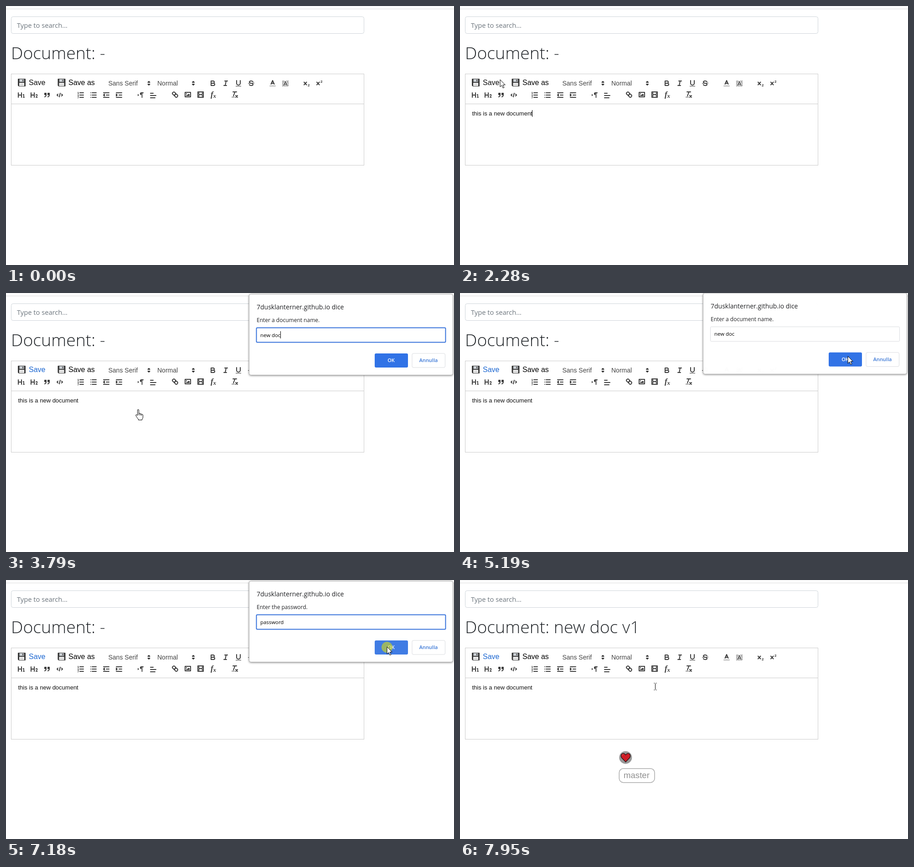
Animation, 983 px wide and 570 px high, one loop 8 s. Source, as an HTML page:

```html
<!DOCTYPE html>
<html lang="en">
<head>
<meta charset="utf-8">
<title>Document editor</title>
<style>
  html, body { margin: 0; height: 100%; overflow: hidden; background: #fff; }
  svg { display: block; }
  .ui { font-family: "Open Sans", "Noto Sans", sans-serif; }
  .arial { font-family: "Liberation Sans", Arial, sans-serif; }
  .stroke, .thin, .digit { fill: none; stroke: #3c3c3c; stroke-width: 2; stroke-linecap: round; stroke-linejoin: round; }
  .thin { stroke-width: 1; }
  .digit { stroke-width: 1.6; }
  .fill { fill: #3c3c3c; }
  .box { fill: #fff; stroke: #ccc; }
  .cursor { fill: #fff; stroke: #000; stroke-linejoin: round; }
  #sheet { filter: drop-shadow(0 1px 2px rgba(0, 0, 0, .45)); }
</style>
</head>
<body>
<svg width="983" height="570" viewBox="0 0 983 570">
  <defs>
    <pattern id="hatch" width="2.5" height="2.5" patternUnits="userSpaceOnUse" patternTransform="rotate(45)">
      <path d="M.6 0V2.5" stroke="#444" stroke-width="1"/>
    </pattern>
    <g id="floppy">
      <path d="M0 1Q0 0 1 0H16Q17 0 17 1V16Q17 17 16 17H2L0 15Z" fill="#383838"/>
      <path d="M3.5 1H13.5V7H3.5Z" fill="#c9ced3"/>
      <path d="M10 2H12V6H10Z" fill="#555"/>
      <path d="M3 9H14V16H3Z" fill="#f4f4f4"/>
      <path d="M4.5 11.5H12.5M4.5 13.5H12.5" stroke="#c4c4c4"/>
    </g>
  </defs>

  <path d="M0 .5H983" stroke="#f0f0f0"/>
  <path d="M0 6.5H983" stroke="#dcdcdc"/>
  <rect class="box" x="11.5" y="23.5" width="774" height="37" rx="4" style="stroke:#ced4da"/>
  <text class="ui" x="24" y="48" font-size="14.7" fill="#6c757d">Type to search...</text>
  <text class="ui" id="title" x="11" y="116.5" font-size="37.4" font-weight="300" fill="#212529"></text>

  <rect class="box" x="11.5" y="149.5" width="774" height="201"/>
  <path d="M11 215.5H786" stroke="#ccc"/>
  <use href="#floppy" x="26" y="160"/>
  <use href="#floppy" x="113.5" y="160"/>
  <g class="arial">
    <text id="save" x="50" y="174" font-size="16">Save</text>
    <text x="137" y="174" font-size="16">Save as</text>
    <g font-size="14" fill="#444">
      <text x="224.5" y="175">Sans Serif</text>
      <text x="332" y="175">Normal</text>
    </g>
    <text id="body" x="26.5" y="241" font-size="13" fill="#111">this is a new document</text>
  </g>
  <g id="icons"></g>
  <rect id="bodyCaret" y="229" width="1" height="15"/>

  <g id="graph">
    <circle cx="363.3" cy="390.7" r="14" fill="#999"/>
    <path d="M363.5 400.5L354.5 391Q351.5 386 355.5 382.5Q360 380 363.5 385Q367 380 371.5 382.5Q375.5 386 372.5 391Z" fill="#cf1d26" stroke="#2a1515" stroke-width="1.3"/>
    <path d="M356 386Q356.5 384 358.5 384" fill="none" stroke="#ee777b"/>
    <rect x="349.3" y="415" width="77.7" height="30.7" rx="9" fill="#fff" stroke="#aaa" stroke-width="1.5"/>
    <text class="arial" x="359" y="436.3" font-size="18.6" fill="#909090">master</text>
  </g>

  <g id="dialog" class="ui">
    <rect id="sheet" x="533.5" y="2.5" width="447" height="178" rx="4" fill="#fff" stroke="#b0b0b0"/>
    <text x="550" y="35.7" font-size="14" fill="#202124">7dusklanterner.github.io dice</text>
    <text id="prompt" x="550" y="64" font-size="12" fill="#202124"></text>
    <rect id="field" x="549.5" y="76.5" width="415" height="32" rx="2" fill="#fff"/>
    <text id="entry" x="558" y="96.6" font-size="11.4"></text>
    <rect id="entryCaret" y="84" width="1" height="16"/>
    <rect id="ok" x="809" y="133" width="73" height="31" rx="3"/>
    <rect x="891" y="133" width="72.5" height="31" rx="3" fill="#fff" stroke="#dadce0"/>
    <g font-size="11" font-weight="600" text-anchor="middle">
      <text x="845" y="152.3" fill="#fff">OK</text>
      <text x="927" y="152.3" fill="#3a77d6">Annulla</text>
    </g>
  </g>

  <circle id="click" r="12" fill="#d7dc14" opacity=".6"/>
  <g id="pointer">
    <path id="beam" d="M-3-7H-1M1-7H3M-3 8H-1M1 8H3M0-6V7" fill="none" stroke="#000" transform="translate(.5)"/>
    <path id="arrow" class="cursor" d="M0 0V16L3.7 12.6L6.3 18.5L8.8 17.4L6.2 11.7H11.2Z"/>
    <path id="hand" class="cursor" d="M-1.5 12.5V1A1.5 1.5 0 0 1 1.5 1V8Q4.5 7 4.5 9Q7.5 8.2 7.5 10Q10.5 9.6 10.5 11.8V16Q10.5 19 8.5 21V22.5H.5V21Q-2.5 17.5-5 13Q-5.8 11-4 10.8Q-2.8 10.8-1.5 12.5ZM1.5 8V12M4.5 9V12.5M7.5 10V13"/>
  </g>
</svg>

<script>
const $ = id => document.getElementById(id);

// Toolbar icons on an 18 px grid: centre x, centre y, strokes, fills, thin strokes, extra markup
const two = y => `<text class="fill arial" x="11" y="${y}" font-size="8" font-weight="bold">2</text>`;
const digit = d => `<path class="digit" d="${d}"/>`;
const letterA = 'M5.5 11L9 3L12.5 11M6.4 9H11.6';
const heading = 'M2 4V14M9 4V14M2 9H9';
const updown = 'M7 11L9 13L11 11ZM7 7L9 5L11 7Z';
const bars = 'M3 4H15M3 14H15M9 9H15';
const cross = 'M3 6.5L8.5 12.5M8.5 6.5L3 12.5';
const icons = [
  [313.5, 170, updown, updown],
  [411, 170, updown, updown],
  [454, 170, 'M5 4H9.5A2.5 2.5 0 0 1 9.5 9H5ZM5 9H10.5A2.5 2.5 0 0 1 10.5 14H5Z'],
  [482, 170, 'M7 4H13M5 14H11M8 14L10 4'],
  [510, 170, 'M5 3V9A4 4 0 0 0 13 9V3', 'M3 15H15V16H3Z'],
  [538, 170, 'M12.9 6C12 3.3 5 3 5 6.5Q5 8 8 8.7M10 9.3Q13 10 13 11.5C13 15 6 14.7 5.1 12', '', 'M2.5 9.5L15.5 8.5'],
  [585, 170, letterA, '', '', '<path class="stroke" opacity=".4" d="M3 15H15"/>'],
  [613, 170, '', '', '', `<path fill="url(#hatch)" d="M2 3H16V16H2Z"/>
    <path d="${letterA}" transform="translate(0 2)" fill="none" stroke="#fff" stroke-width="4"/>
    <path class="digit" d="${letterA}" transform="translate(0 2)"/>`],
  [660, 170, cross, '', '', two(16)],
  [688, 170, cross, '', '', two(8)],
  [34, 196, heading, '', '', digit('M12.3 8.5L14 7.7V14M12.6 14H15.6')],
  [62, 196, heading, '', '', digit('M12.5 9Q13.5 7.3 15.3 8.3Q16.5 10 12.6 14H16')],
  [90, 196, 'M4 5H7V8H4ZM11 5H14V8H11ZM7 8Q7 12 4 13M14 8Q14 12 11 13', 'M4 5H7V8H4ZM11 5H14V8H11Z'],
  [118, 196, 'M5 7L3 9L5 11M13 7L15 9L13 11M10 5L8 13'],
  [164, 196, 'M7 4H15M7 9H15M7 14H15', '', 'M2.5 3L3.5 2.5V5.5M2.5 5.5H4.5M2.5 8Q4 7 4.3 8L2.5 10.5H4.5M2.5 12.5H4.3L3.3 14Q5.5 14.5 2.5 16'],
  [192, 196, 'M6 4H15M6 9H15M6 14H15M3 4H3M3 9H3M3 14H3'],
  [220, 196, bars + 'M5 7V11L3 9Z'],
  [248, 196, bars + 'M3 7V11L5 9Z', 'M3 7V11L5 9Z'],
  [295, 196, 'M11 4H15', 'M3 6.5V11.5L6 9ZM11 3A3 3 0 0 0 11 9V15H12V4H13V15H14V3Z'],
  [323, 197, 'M3 4H9M3 9H15M3 14H13'],
  [371, 195, 'M7 11L11 7M8.9 4.6C12 8 8 12 4.6 8.9Q1.5 6.5 4.2 4.2T8.9 4.6ZM13.4 9.1C10 6 6 10 9.1 13.4Q11.5 16.5 13.8 13.8T13.4 9.1Z'],
  [399, 195, 'M3 4H15V14H3Z', 'M5 12V11L7 9L8 10L11 7L13 9V12ZM5 6H7V8H5Z'],
  [427, 195, 'M3 3H15V15H3Z', 'M5 3H6V15H5ZM12 3H13V15H12ZM5 8H13V10H5Z', 'M3 5.5H6M3 7.5H6M3 10.5H6M3 12.5H6M12 5.5H15M12 7.5H15M12 10.5H15M12 12.5H15'],
  [455, 196, '', '', '', '<g class="fill" font-family="Liberation Serif, serif" font-style="italic" font-weight="bold"><text x="3" y="13" font-size="17">f</text><text x="8.5" y="15" font-size="13">x</text></g>'],
  [502, 195, 'M5 3H13M6 12L9.4 3M11 11L15 15M15 11L11 15', 'M2 14H9V15H2Z'],
];
$('icons').innerHTML = icons.map(([x, y, stroke, fill = '', thin = '', extra = '']) =>
  `<g transform="translate(${x - 9} ${y - 9})"><path class="fill" d="${fill}"/>
   <path class="stroke" d="${stroke}"/><path class="thin" d="${thin}"/>${extra}</g>`).join('');

// Pointer path: time, x, y
const path = [
  [40, 659, 440], [370, 250, 259], [1850, 250, 259], [2220, 110, 172], [2360, 56, 147], [2490, 41, 161],
  [2940, 41, 161], [3270, 290, 257], [4400, 290, 257], [4900, 851, 139], [6900, 851, 139],
  [7090, 836, 147], [7430, 836, 147], [7620, 833, 161], [7740, 833, 161], [7950, 428, 234], [8000, 428, 234],
];
const clicks = [[390, 510], [2640, 2780], [5000, 5150], [7130, 7270]];
const prompts = [
  { open: 2780, close: 5160, typed: 3790, caretOff: 4220, ask: 'Enter a document name.', answer: 'new doc' },
  { open: 5250, close: 7280, typed: 6240, caretOff: 6750, ask: 'Enter the password.', answer: 'password' },
];

const clamp = v => Math.max(0, Math.min(1, v));
const within = (t, a, b) => t >= a && t < b;
const show = (id, on) => $(id).setAttribute('visibility', on ? 'visible' : 'hidden');
const set = (id, attrs) => { for (const k in attrs) $(id).setAttribute(k, attrs[k]); };

function pointerAt(t) {
  const i = Math.max(1, path.findIndex(p => p[0] > t));
  const [t0, x0, y0] = path[i - 1], [t1, x1, y1] = path[i];
  const k = clamp((t - t0) / (t1 - t0)), e = k * k * (3 - 2 * k);
  return [x0 + (x1 - x0) * e, y0 + (y1 - y0) * e];
}

function drawPointer(t) {
  const [x, y] = pointerAt(t);
  const hand = t > 2330 && t < 5200 && x < 533;
  const beam = !hand && y > 216 && y < 350 && x < 786;
  set('pointer', { transform: `translate(${Math.round(x)} ${Math.round(y)})` });
  show('hand', t >= 40 && hand);
  show('beam', t >= 40 && beam);
  show('arrow', t >= 40 && !hand && !beam);
  set('click', { cx: x, cy: y + 1 });
  show('click', clicks.some(([a, b]) => within(t, a, b)));
}

function drawDialog(t) {
  const p = prompts.find(p => within(t, p.open, p.close + 130));
  $('dialog').style.display = p ? '' : 'none';
  if (!p) return;
  const rest = (1 - clamp((t - p.open) / 300)) ** 2;
  const leave = clamp((t - p.close) / 130), closing = leave > 0;
  const grow = 1 + rest * .006;
  set('dialog', {
    opacity: clamp((t - p.open) / 110) * (1 - leave ** 3),
    transform: `translate(${757 * (1 - grow)} ${-15 * rest - 9 * leave}) scale(${grow} 1)`,
  });
  $('prompt').textContent = p.ask;
  $('entry').textContent = t >= p.typed ? p.answer : '';
  set('field', { stroke: closing ? '#dadce0' : '#3873db', 'stroke-width': closing ? 1 : 2 });
  set('ok', { fill: within(t, 7100, 7280) ? '#407ce4' : '#3072e6' });
  set('entryCaret', { x: t >= p.typed ? Math.round(558 + $('entry').getComputedTextLength()) : 557 });
  const caret = within(t, p.open, p.open + 490) || within(t, p.typed, p.caretOff);
  $('entryCaret').style.display = caret && !closing ? '' : 'none';
}

function draw(t) {
  const saved = t >= 7480, written = t >= 1110;
  $('title').textContent = 'Document: ' + (saved ? 'new doc v1' : '-');
  show('graph', t >= 7600);
  show('body', written);
  set('save', { fill: t >= 2360 ? '#1f69d2' : '#111' });
  set('bodyCaret', { x: written ? 158 : 27 });
  show('bodyCaret', within(t, 480, 980) || within(t, 1110, 1620) || within(t, 2120, 2640));
  drawDialog(t);
  drawPointer(t);
}

function frame() {
  draw(performance.now() % 8000);
  requestAnimationFrame(frame);
}
frame();
</script>
</body>
</html>
```
